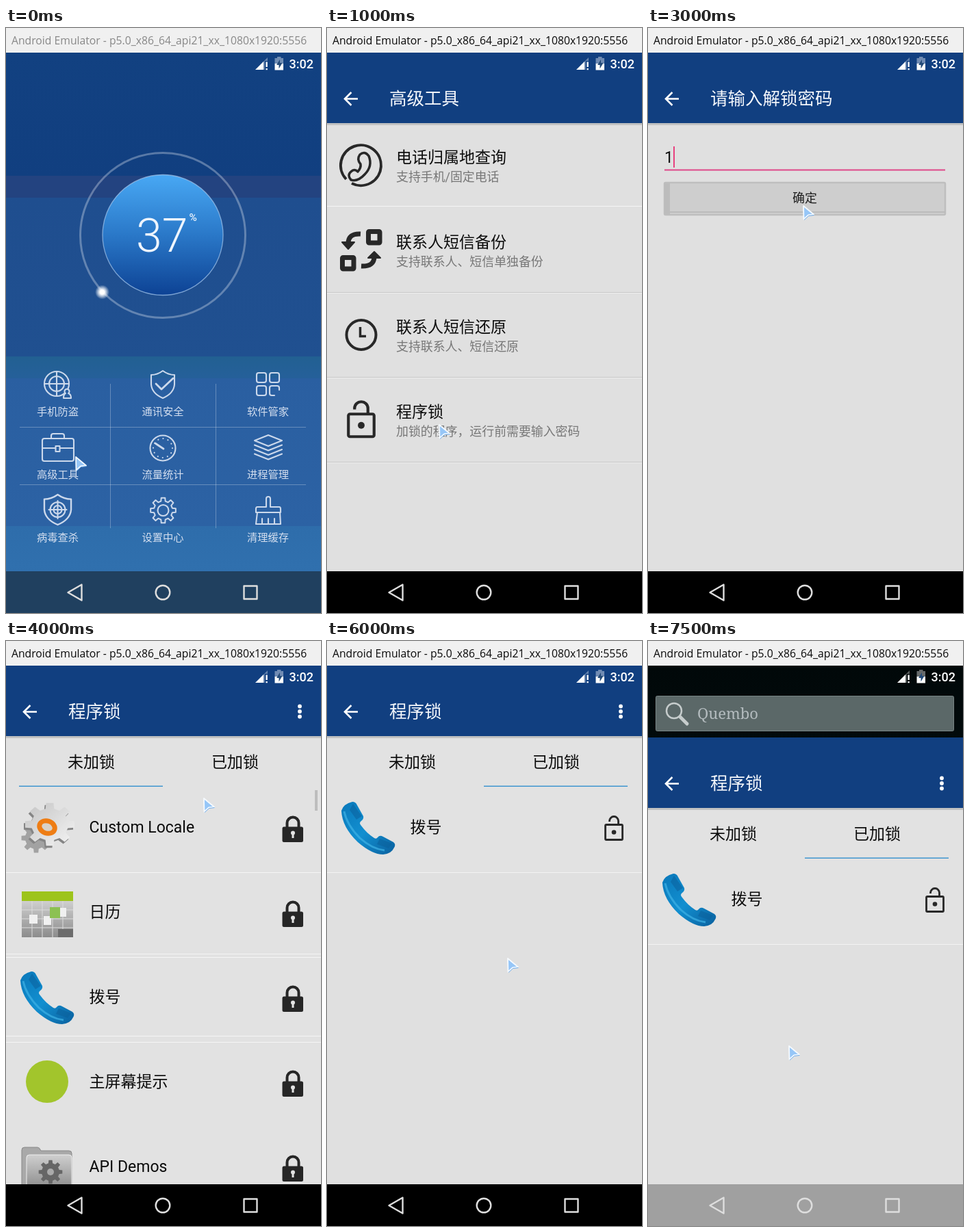
An HTML page for the animation above (8000 ms loop, 460 by 855 pixels).

```html
<!DOCTYPE html>
<html lang="zh-CN">
<head>
<meta charset="utf-8">
<title>App lock demo</title>
<style>
html, body { margin: 0; height: 100%; overflow: hidden; background: #000 }
svg { display: block; width: 460px; height: 855px }
text { font-family: Roboto, "Noto Sans CJK SC", "Noto Sans CJK", sans-serif; white-space: pre }
.bar { font: 15.72px "Open Sans", "Noto Sans", sans-serif }
.head { font-size: 25.5px; fill: #f4f7fb }
.big { font-size: 23px; fill: #0c0c0c }
.sub { font-size: 17.9px; fill: #777 }
.label { font-size: 15.3px; font-weight: 300; fill: #d3deef; text-anchor: middle }
.line { fill: none; stroke: #ccd9ec; stroke-width: 2.1; stroke-linejoin: round; stroke-linecap: round }
.ink { fill: none; stroke: #282828; stroke-width: 4 }
.nav { fill: none; stroke: #dedede; stroke-width: 2.4; stroke-linejoin: round }

.anim { animation: 8s step-end infinite }
#bar { animation-name: bar }
#dot { animation-name: dot; transform-origin: 229px 303px }
#home { animation-name: home }
#tools { animation-name: tools }
#pass { animation-name: pass }
#empty { animation-name: empty }
#typed { animation-name: typed }
#launcher { animation-name: launcher }
#lock { animation-name: lock }
#open { animation-name: open }
#done { animation-name: done }
#scroll { animation-name: scroll }
#dial { animation-name: dial }
#nav { animation-name: nav }
#mouse { animation-name: mouse }

@keyframes bar { 0% { fill: #888 } 6.25%, 100% { fill: #0a0a0a } }
@keyframes dot { 0% { transform: none } 6.25%, 100% { transform: rotate(90deg) } }
@keyframes home { 0% { opacity: 1 } 12.5%, 100% { opacity: 0 } }
@keyframes tools { 0% { opacity: 0 } 12.5% { opacity: 1 } 31.25%, 100% { opacity: 0 } }
@keyframes pass {
  0% { opacity: 0; transform: none }
  25% { opacity: .6; transform: translateY(24px) }
  31.25% { opacity: 1; transform: none }
  50%, 100% { opacity: 0; transform: none }
}
@keyframes empty { 0% { opacity: 1 } 37.5%, 100% { opacity: 0 } }
@keyframes typed { 0% { opacity: 0 } 37.5%, 100% { opacity: 1 } }
@keyframes launcher { 0% { opacity: 0 } 93.75%, 100% { opacity: 1 } }
@keyframes lock {
  0% { opacity: 0; transform: none }
  43.75% { opacity: .6; transform: translateY(24px) }
  50% { opacity: 1; transform: none }
  93.75%, 100% { opacity: 1; transform: translateY(105px) }
}
@keyframes open { 0% { opacity: 0 } 50% { opacity: 1 } 75%, 100% { opacity: 0 } }
@keyframes done { 0% { opacity: 0 } 75%, 100% { opacity: 1 } }
@keyframes scroll { 0% { opacity: 1 } 56.25%, 100% { opacity: 0 } }
@keyframes dial {
  0% { opacity: 1; transform: none }
  56.25% { opacity: 1; transform: translateX(20px) }
  62.5%, 100% { opacity: 0; transform: none }
}
@keyframes nav { 0% { fill: #20405f } 12.5% { fill: #000 } 93.75%, 100% { fill: #a0a0a0 } }
@keyframes mouse {
  0% { transform: translate(101px, 626px); opacity: 1 }
  12.5% { transform: translate(163px, 579px); opacity: 1 }
  18.75% { transform: translate(216px, 546px); opacity: 1 }
  31.25% { transform: translate(226px, 259px); opacity: 1 }
  50% { transform: translate(288px, 229px); opacity: 1 }
  56.25% { transform: translate(413px, 527px); opacity: 1 }
  62.5% { transform: translate(369px, 170px); opacity: 1 }
  75% { transform: translate(263px, 463px); opacity: 1 }
  81.25% { transform: translate(240px, 527px); opacity: 0 }
  87.5% { transform: translate(240px, 527px); opacity: 1 }
  93.75%, 100% { transform: translate(205px, 591px); opacity: 1 }
}
</style>
</head>
<body>
<svg viewBox="0 0 460 855" xmlns="http://www.w3.org/2000/svg">
<defs>
  <clipPath id="screen"><path d="M0 36h460v758H0z"/></clipPath>
  <linearGradient id="sky" gradientUnits="userSpaceOnUse" x1="0" y1="36" x2="0" y2="794">
    <stop offset="0" stop-color="#124181"/><stop offset=".237" stop-color="#113f80"/>
    <stop offset=".237" stop-color="#234380"/><stop offset=".28" stop-color="#234380"/>
    <stop offset=".28" stop-color="#1f4e8f"/><stop offset=".586" stop-color="#205090"/>
    <stop offset=".586" stop-color="#226092"/><stop offset=".628" stop-color="#25609a"/>
    <stop offset=".628" stop-color="#2a5fa1"/><stop offset=".913" stop-color="#2c62a4"/>
    <stop offset=".913" stop-color="#2e6dab"/><stop offset="1" stop-color="#3070ae"/>
  </linearGradient>
  <linearGradient id="orb" x2="0" y2="1">
    <stop stop-color="#48a8f4"/><stop offset=".5" stop-color="#2a78c8"/><stop offset="1" stop-color="#0d4294"/>
  </linearGradient>
  <radialGradient id="glow">
    <stop offset=".3" stop-color="#fff"/><stop offset=".6" stop-color="#fff" stop-opacity=".6"/><stop offset="1" stop-color="#fff" stop-opacity="0"/>
  </radialGradient>
  <linearGradient id="night" x2="0" y2="1">
    <stop stop-color="#010809"/><stop offset="1" stop-color="#06191b"/>
  </linearGradient>
  <linearGradient id="grey" x2="0" y2="1"><stop stop-color="#cfcfcf"/><stop offset="1" stop-color="#8c8c8c"/></linearGradient>
  <linearGradient id="steel" x2="1" y2="1"><stop stop-color="#c4c4c4"/><stop offset="1" stop-color="#f4f4f4"/></linearGradient>
  <linearGradient id="blue" x2="1" y2="1"><stop stop-color="#0a78ba"/><stop offset=".5" stop-color="#128fd0"/><stop offset="1" stop-color="#0a609e"/></linearGradient>

  <g id="header">
    <path fill="#e0e0e0" d="M0 36h460v819H0z"/>
    <path fill="#113f80" d="M0 36h460v103H0z"/>
    <path fill="#000" opacity=".14" d="M0 139h460v3H0z"/>
    <path d="M45 103.500H26m9.500-9.500L26 103.500l9.500 9.500" fill="none" stroke="#fff" stroke-width="2.600"/>
  </g>
  <g id="shut">
    <path d="M410.500 274v-8a8.500 8.500 0 0 1 17 0v8" fill="none" stroke="#262626" stroke-width="4"/>
    <rect x="403.500" y="271.500" width="30.500" height="22.500" rx="2.500" fill="#262626"/>
    <path d="M417.500 281h3v7h-3z" fill="#e3e3e3"/><circle cx="419" cy="280.500" r="3" fill="#e3e3e3"/>
  </g>
  <g id="unlock" fill="none" stroke="#282828" stroke-width="2.800">
    <path d="M7.500 9V8a6.500 6.500 0 0 1 13 0v5.500"/>
    <rect x="1.500" y="13.500" width="25" height="22" rx="1.500"/>
    <circle cx="14" cy="24.500" r="3.300" fill="#282828" stroke="none"/>
  </g>
  <g id="phone">
    <path fill="url(#blue)" d="M21 248Q24 238 37 235Q42 235 44 240L53 256Q54 260 50 263Q46 266 50 270Q58 281 69 288Q72 290 74 287Q77 283 82 286L97 294Q101 297 98 302Q94 311 82 312Q66 312 45 294Q22 272 21 248z"/>
    <path fill="none" stroke="#3fb2e6" stroke-width="3" opacity=".7" d="M25 249Q29 269 48 288Q66 304 84 306"/>
    <path fill="#0b5f9a" opacity=".5" d="M38 238l13 18-8 5-10-14zM77 289l18 7-5 7-17-6z"/>
  </g>
  <path id="cog"/>
  <path id="shield" d="M0-20Q8-14 17-14V0Q16 13 0 20Q-16 13-17 0V-14Q-8-14 0-20z"/>
</defs>

<g clip-path="url(#screen)">
  <g id="home" class="anim">
    <path fill="url(#sky)" d="M0 36h460v758H0z"/>
    <circle cx="229" cy="303" r="120.500" fill="none" stroke="#fff" stroke-opacity=".3" stroke-width="3"/>
    <circle cx="229" cy="302.500" r="88" fill="url(#orb)" stroke="#9cc0e8" stroke-opacity=".75" stroke-width="1.300"/>
    <text x="190" y="327" font-size="68" font-weight="300" fill="#eef5fd">37</text>
    <text x="267.500" y="281.500" font-size="15.500" font-weight="500" fill="#eef5fd">%</text>
    <circle id="dot" class="anim" cx="140.500" cy="386" r="10.500" fill="url(#glow)"/>
    <path d="M20 583.500h418M20 667.500h418M152.500 520v211M306.500 520v211" stroke="#fff" stroke-opacity=".28"/>
    <g class="line">
      <circle cx="74" cy="520" r="18"/><circle cx="74" cy="520" r="11"/>
      <path d="M74 502v36M56 520h36"/>
      <path d="M84 541q0-6 3-7a3.500 3.500 0 1 1 4 0q4 1 4 7z" fill="#2a5fa1"/>
      <g transform="translate(229 521)"><use href="#shield"/><path d="M-10-1L-2 7L15-9" stroke-width="2.800"/></g>
      <rect x="366" y="504" width="14" height="14" rx="3"/><rect x="385" y="504" width="14" height="14" rx="3"/>
      <rect x="366" y="523" width="14" height="14" rx="3"/><path d="M392 537h-4q-3 0-3-3v-8q0-3 3-3h8q3 0 3 3v3"/>
      <rect x="53" y="600" width="46" height="33" rx="3"/>
      <path d="M66 600v-4q0-3 3-3h13q3 0 3 3v4M53 614h19m7 0h20M72.500 611h6v8h-6z"/>
      <circle cx="229" cy="614" r="18.500"/><path d="M230 615l-12-8" stroke-width="2.800"/>
      <circle cx="229" cy="614" r="14" stroke-dasharray=".1 7.230"/>
      <path d="M363 603l20-8 20 8-20 8zM363 609.500l20 8 20-8M363 616l20 8 20-8M363 622.500l20 8 20-8"/>
      <g transform="translate(75.500 704)"><use href="#shield" transform="scale(1.150 1.100)"/><circle r="11"/><circle r="6"/><path d="M-13 0h26M0-13v26"/></g>
      <g transform="translate(229.500 705)"><circle r="8"/><use href="#cog" transform="scale(.53)" stroke-width="3.800"/></g>
      <path d="M380 700v-12q0-3 3-3t3 3v12h13q2 0 2 3v5h-36v-5q0-3 2-3zM367 708l-2 17h36l-1-17M374 725v-8m9 8v-8m9 8v-8"/>
    </g>
    <g class="label">
      <text x="75.500" y="565.500">手机防盗</text><text x="229" y="565.500">通讯安全</text><text x="382.500" y="565.500">软件管家</text>
      <text x="75.500" y="657.500">高级工具</text><text x="229" y="657.500">流量统计</text><text x="382.500" y="657.500">进程管理</text>
      <text x="75.500" y="749.500">病毒查杀</text><text x="229" y="749.500">设置中心</text><text x="382.500" y="749.500">清理缓存</text>
    </g>
  </g>

  <g id="tools" class="anim">
    <use href="#header"/>
    <text class="head" x="91" y="112">高级工具</text>
    <path d="M0 260.500h460" stroke="#f6f6f6"/>
    <path d="M0 386.500h460M0 510.500h460M0 634.500h460" stroke="#c6c6c6"/>
    <path d="M0 387.500h460M0 511.500h460M0 635.500h460" stroke="#efefef"/>
    <g class="ink">
      <path d="M28 221A29.500 29.500 0 1 1 36 227"/>
      <path d="M35 222Q29 215 35 210Q40 205 45 210Q50 204 49 199Q43 192 48 185Q55 179 61 187Q67 202 55 214Q45 225 35 222z" stroke-width="3.500" stroke-linejoin="round"/>
      <rect x="60.500" y="297.500" width="16.500" height="16.500" rx="1" stroke-width="7"/>
      <rect x="22.500" y="335.500" width="16.500" height="16.500" rx="1" stroke-width="7"/>
      <path d="M49 301Q31 300 31 315M50 348Q69 349 69 334" stroke-width="7"/>
      <path d="M22 313h18l-9 10zM60 336h18l-9-9z" fill="#282828" stroke-width="2" stroke-linejoin="round"/>
      <circle cx="50" cy="448.500" r="21.500"/><path d="M48.500 437v13.500H57" stroke-width="3.500"/>
    </g>
    <use href="#unlock" transform="translate(29 544) scale(1.500)"/>
    <g class="big">
      <text x="101" y="197">电话归属地查询</text><text x="101" y="321">联系人短信备份</text>
      <text x="101" y="445">联系人短信还原</text><text x="101" y="569">程序锁</text>
    </g>
    <g class="sub">
      <text x="101" y="223.500">支持手机/固定电话</text><text x="101" y="347.500">支持联系人、短信单独备份</text>
      <text x="101" y="471.500">支持联系人、短信还原</text><text x="101" y="595.500">加锁的程序，运行前需要输入密码</text>
    </g>
  </g>

  <g id="pass" class="anim">
    <use href="#header"/>
    <text class="head" x="91" y="112">请输入解锁密码</text>
    <path d="M24 207.500h410" stroke="#e0488a" stroke-width="2"/>
    <rect x="24" y="226" width="410" height="47" rx="2" fill="#d3d3d3" stroke="#c2c2c2" stroke-width="2"/>
    <path id="empty" class="anim" d="M25.500 173v31" stroke="#e8407f" stroke-width="2"/>
    <g id="typed" class="anim">
      <rect x="24" y="226" width="410" height="47" rx="2" fill="#cecece" stroke="#bebebe" stroke-width="2.500"/>
      <path d="M28 227v45" stroke="#bcbcbc" stroke-width="8"/>
      <path d="M32 269h402" stroke="#bbb" stroke-width="2"/>
      <text class="big" x="24" y="197">1</text>
      <path d="M38 173v31" stroke="#e8407f" stroke-width="2"/>
    </g>
    <text x="229" y="255" font-size="17.900" font-weight="500" fill="#1c1c1c" text-anchor="middle">确定</text>
  </g>

  <g id="launcher" class="anim">
    <path fill="url(#night)" d="M0 36h460v758H0z"/>
    <rect x="11.500" y="80.500" width="435" height="51" rx="2" fill="#5b6868" stroke="#788484"/>
    <g fill="none" stroke="#c6cccc"><circle cx="38" cy="102" r="11" stroke-width="2.500"/><path d="M47 111l10 10" stroke-width="5" stroke-linecap="round"/></g>
    <text x="72" y="113.500" style="font:22px 'Noto Serif',serif" fill="#b4bcbf">Quembo</text>
  </g>

  <g id="lock" class="anim">
    <use href="#header"/>
    <text class="head" x="91" y="112">程序锁</text>
    <g fill="#fff"><circle cx="429" cy="95.500" r="2.900"/><circle cx="429" cy="103" r="2.900"/><circle cx="429" cy="110.500" r="2.900"/></g>
    <path fill="#e2e2e2" d="M0 142h460v196H0z"/>
    <text class="big" x="90" y="184.500">未加锁</text><text class="big" x="300" y="184.500">已加锁</text>
    <g id="open" class="anim">
      <path fill="#e2e2e2" d="M0 338h460v456H0z"/>
      <path d="M19 212.300h210" stroke="#3e95cf" stroke-width="1.500"/>
      <path d="M0 338.500h460M0 457.500h460M0 462.500h460M0 577.500h460M0 586.500h460" stroke="#f5f5f5"/>
      <path id="scroll" class="anim" d="M453 218v30" stroke="#bdbdbd" stroke-width="4"/>
      <g>
        <use href="#cog" transform="translate(44 288) scale(.62)" fill="#a2a2a2"/>
        <use href="#cog" transform="translate(62 271) scale(1.040 .9)" fill="#858585"/>
        <use href="#cog" transform="translate(64 268) scale(1.040 .9)" fill="url(#steel)"/>
        <ellipse cx="60" cy="272" rx="11.500" ry="9" transform="rotate(20 60 272)" fill="#d9d2c8" stroke="#ee7d14" stroke-width="7"/>
        <text class="big" x="121.500" y="280">Custom Locale</text><use href="#shut"/>
      </g>
      <g transform="translate(0 124)">
        <path fill="url(#grey)" d="M23 256h75v53H23z"/><path fill="#9dc41c" d="M23 242h75v14H23z"/>
        <path d="M38 256v53m15-53v53m15-53v53m15-53v53M23 269h75M23 282h75M23 295h75" stroke="#dcdcdc"/>
        <path fill="#f0f0f0" d="M34 276h12v13H34zM55 278h11v13H55zM78 266h10v13H78z"/>
        <path fill="#8cc152" d="M64 265h15v16H64z"/><path fill="#6c6c6c" d="M76 297h22v12H76z"/>
        <text class="big" x="121.500" y="279.500">日历</text><use href="#shut"/>
      </g>
      <g transform="translate(0 248)"><g id="dial" class="anim">
        <use href="#phone"/><text class="big" x="121.500" y="279.500">拨号</text><use href="#shut"/>
      </g></g>
      <g transform="translate(0 372)">
        <circle cx="60" cy="272" r="31" fill="#a2c52c"/>
        <text class="big" x="121.500" y="279.500">主屏幕提示</text><use href="#shut"/>
      </g>
      <g transform="translate(0 496)">
        <path fill="#a9a9a9" stroke="#888" d="M23 300v-52q0-4 4-4h19q3 0 5 5h41q4 0 4 4v50z"/>
        <path fill="url(#grey)" stroke="#eee" d="M30 304v-45q0-4 4-4h58q4 0 4 4v45z"/>
        <use href="#cog" transform="translate(65 280) scale(.5)" fill="#666"/>
        <circle cx="65" cy="280" r="5" fill="#aaa"/>
        <text class="big" x="121.500" y="280">API Demos</text><use href="#shut"/>
      </g>
    </g>
    <g id="done" class="anim">
      <path d="M229 212.300h210" stroke="#3e95cf" stroke-width="1.500"/>
      <path d="M0 338.500h460" stroke="#f2f2f2"/>
      <use href="#phone"/><text class="big" x="121.500" y="279.500">拨号</text>
      <use href="#unlock" transform="translate(405 255)"/>
    </g>
  </g>
</g>

<g fill="#fff">
  <path d="M364 61l12-12v12z"/><path d="M376 49l6-6v5h-4v13h-2z" opacity=".35"/><path d="M379.500 49.500h2.300v7.500h-2.300zM379.500 59h2.300v2.200h-2.300z"/>
  <path d="M392.500 44h3.500v-2h5.500v2h3.500v8h-12.500z" opacity=".4"/><path d="M392.500 52h12.500v9.500h-12.500z"/>
  <path d="M400 46v5h3.500l-5 8.500v-5.500h-3.500z" fill="#234a78"/>
  <text x="413.500" y="58.500" font-size="18" font-weight="500">3:02</text>
</g>
<path fill="#f0f0f0" d="M0 0h460v36H0z"/>
<text id="bar" class="bar anim" x="8" y="23.500">Android Emulator - p5.0_x86_64_api21_xx_1080x1920:5556</text>
<path id="nav" class="anim" d="M0 794h460v61H0z"/>
<g class="nav"><path d="M90.500 825l20-11.500v23z"/><circle cx="229" cy="825" r="10.300"/><path d="M347.500 815.500h19v19h-19z"/></g>
<g id="mouse" class="anim">
  <path d="M1 1L16 13.500L8 14.500L1.500 20.500z" fill="#96c6f7" stroke="#f5faff" stroke-width="1.800" stroke-linejoin="round"/>
  <path d="M16.500 14.500L8.500 15.500L2 21.500" fill="none" stroke="#6aa8e8" stroke-width="1"/>
</g>
</svg>
<script>
// Eight-toothed gear outline around the origin
function gear(inner, outer, teeth) {
  const points = [];
  for (let i = 0; i < teeth; i++) {
    for (const [r, turn] of [[inner, -.3], [outer, -.19], [outer, .19], [inner, .3]]) {
      const a = (i + turn) / teeth * 2 * Math.PI;
      points.push((r * Math.sin(a)).toFixed(1) + ' ' + (-r * Math.cos(a)).toFixed(1));
    }
  }
  return 'M' + points.join('L') + 'z';
}
document.getElementById('cog').setAttribute('d', gear(26, 35, 8));
</script>
</body>
</html>
```
